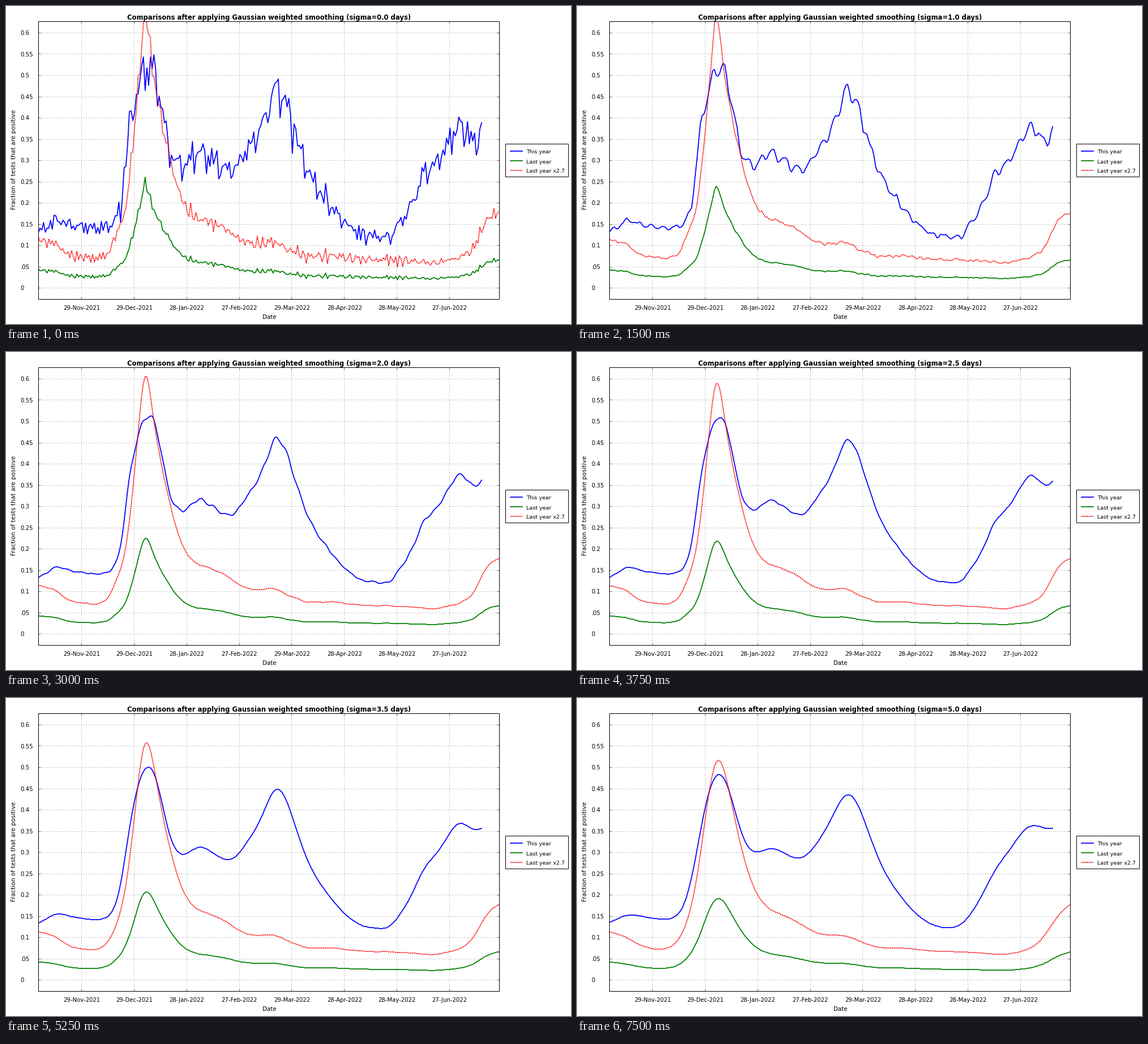
A matplotlib script that plays this animation: 998 px wide and 561 px high, repeating every 8 s.

```python
import numpy as np
import matplotlib.pyplot as plt
from matplotlib.animation import FuncAnimation
from matplotlib.patches import Rectangle

W, H = 998, 561
PX = 0.72                                   # points per pixel at 100 dpi
LEFT, TOP, RIGHT, BOTTOM = 57, 27, 871, 517
Y_SCALE = 750                               # pixels per unit of the y axis
LAST_DAY, PAD = 263, 20
RATIO = 2.7

plt.rcParams["font.family"] = "DejaVu Sans"

# Turning points of the two waves: day, height in thousandths
THIS_YEAR = [
    (-20, 122), (0, 130), (10, 159), (22, 145), (36, 139), (42, 148),
    (47, 185), (53, 412), (60, 505), (66, 522), (75, 315), (82, 283),
    (92, 321), (104, 284), (111, 277), (121, 332), (129, 390), (135, 472),
    (141, 438), (152, 290), (160, 229), (174, 155), (185, 124), (200, 117),
    (212, 185), (220, 268), (228, 296), (240, 383), (251, 335), (253, 400),
]
LAST_YEAR = [
    (-20, 46), (0, 42), (10, 38.5), (17, 28.5), (34, 25), (40, 30),
    (47, 56), (50, 68), (56, 155), (61, 250), (66, 180), (71, 142),
    (77, 100), (83, 72), (90, 61), (104, 54), (114, 43), (122, 38),
    (135, 40), (143, 33), (154, 27), (168, 28), (185, 24.5), (202, 24.5),
    (226, 21.5), (238, 25), (248, 33), (256, 60), (262, 65), (283, 84),
]


def make_series(points, last, weekly, floor, share, seed):
    """Trend, a low count once a week, and daily scatter."""
    days = np.arange(-PAD, last + 1)
    trend = np.interp(days, *np.transpose(points)) / 1000
    phase = (days - 5) % 7
    week = weekly * (0.15 * (phase - 2.3) - 0.7 * (phase == 0))
    rng = np.random.default_rng(seed)
    scatter = np.diff(rng.normal(0, 1, len(days) + 1))
    return trend * (1 + week) + scatter * (floor + share * trend)


def smooth(data, sigma):
    if sigma == 0:
        return data
    i = np.arange(len(data))
    w = np.exp(-0.5 * ((i[:, None] - i) / sigma) ** 2)
    return w @ data / w.sum(axis=1)


def to_pixel(y):
    return np.round(y * Y_SCALE) / Y_SCALE


this_year = make_series(THIS_YEAR, 253, 0.1, 0.004, 0.012, seed=4)
last_year = make_series(LAST_YEAR, LAST_DAY + PAD, 0, 0.0012, 0.02, seed=5)

fig = plt.figure(figsize=(W / 100, H / 100), dpi=100, facecolor="white")
ax = fig.add_axes([LEFT / W, 1 - BOTTOM / H,
                   (RIGHT - LEFT) / W, (BOTTOM - TOP) / H])
ax.set_xlim(0, LAST_DAY)
ax.set_ylim(-20 / Y_SCALE, 470 / Y_SCALE)


def label(x, y, text, size, **kw):
    kw = {"ha": "center", "va": "baseline", **kw}
    return fig.text(x / W, 1 - y / H, text, fontsize=size * PX, **kw)


x_ticks = 24.56 + 30 * np.arange(8)
y_ticks = np.arange(13) * 0.05
ax.set_xticks(x_ticks, [])
ax.set_yticks(y_ticks, [])
ax.tick_params(direction="in", top=True, right=True,
               length=4 * PX, width=0.5 * PX)
ax.grid(color="black", lw=0.5 * PX, ls=(0, (2, 6)))
ax.set_axisbelow(True)
for spine in ax.spines.values():
    spine.set_linewidth(PX)

dates = ["29-Nov-2021", "29-Dec-2021", "28-Jan-2022", "27-Feb-2022",
         "29-Mar-2022", "28-Apr-2022", "28-May-2022", "27-Jun-2022"]
for i, date in enumerate(dates):
    label(134 + 92.8 * i, 536, date, 10.15)
for v in y_ticks:
    text = ".05" if abs(v - 0.05) < 0.001 else f"{v:.2g}"
    label(25.5, 501.3 - v * Y_SCALE, text, 10.2, ha="left")
label(465, 552.5, "Date", 10.2)
label(19, 270.5, "Fraction of tests that are positive", 10.5,
      rotation=90, ha="right", va="center")
title = label(465, 24, "", 11.6, weight="bold")

styles = [("This year", dict(color="#0000ff", ls="-")),
          ("Last year", dict(color="#008000", ls="-")),
          ("Last year x2.7", dict(color="#ff0000", ls=(0, (1.2, 0.65))))]
lines = []
fig.add_artist(Rectangle((882 / W, 1 - 301 / H), 111 / W, 58 / H,
                         fc="white", ec="black", lw=PX))
for i, (name, style) in enumerate(styles):
    style = dict(style, lw=1.75 * PX, dash_capstyle="butt")
    lines.append(ax.plot([], [], **style)[0])
    y = 256 + 17 * i
    fig.add_artist(plt.Line2D([890.5 / W, 912 / W], [1 - y / H] * 2, **style))
    label(919, y + 4.5, name, 9.5, ha="left")


def draw(n):
    sigma = 0.5 * (n // 3)
    title.set_text("Comparisons after applying Gaussian weighted smoothing "
                   f"(sigma={sigma:.1f} days)")
    now = smooth(this_year, sigma)[PAD:]
    before = smooth(last_year, sigma)[PAD:PAD + LAST_DAY + 1]
    for line, y in zip(lines, (now, before, before * RATIO)):
        line.set_data(np.arange(len(y)), to_pixel(y))
    return [*lines, title]


anim = FuncAnimation(fig, draw, frames=32, interval=250,
                     repeat=True, repeat_delay=0, blit=False)
plt.show()
```
